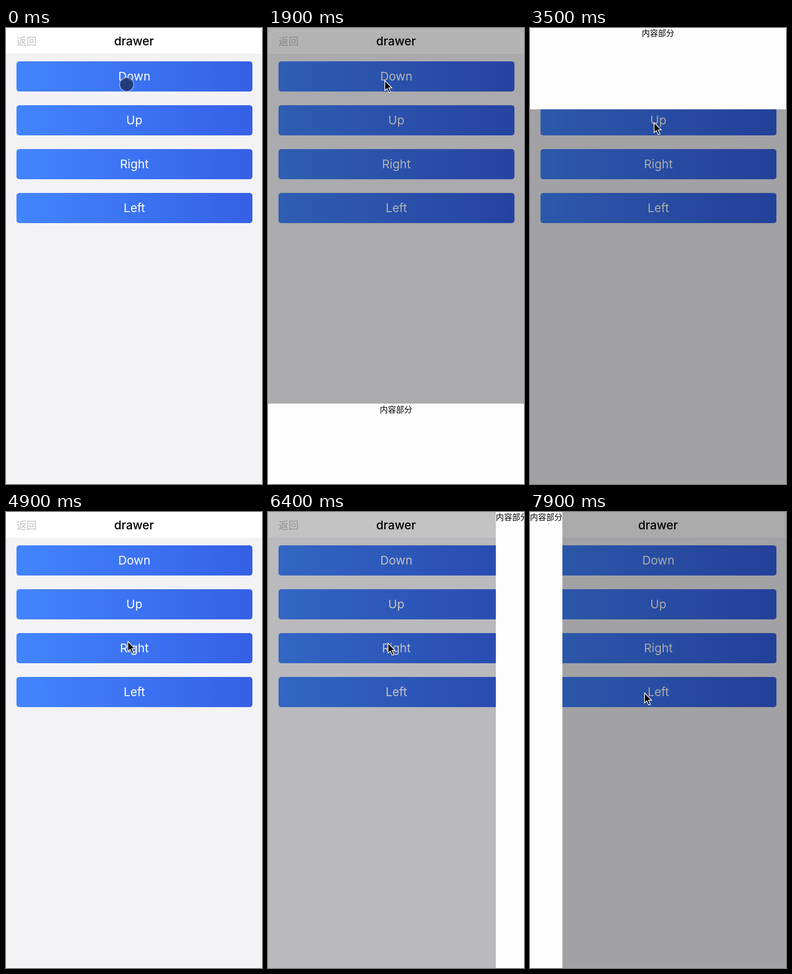
Animation, 561 px wide and 998 px high, one loop 8 s. Source, as an HTML page:

```html
<!DOCTYPE html>
<html lang="zh">
<head>
<meta charset="utf-8">
<title>drawer</title>
<style>
  html, body { margin: 0; width: 100%; height: 100%; overflow: hidden; background: #f3f2f5; }
  #stage { position: relative; width: 561px; height: 998px; overflow: hidden; background: #f3f2f5;
    font-family: Inter, "Noto Sans CJK SC", sans-serif; }
  #stage > * { position: absolute; }
  header { left: 0; top: 0; width: 561px; height: 57px; background: #fff; border-bottom: 1px solid #e6e5e8;
    font: 500 26px/57px Inter, sans-serif; color: #000; text-align: center; }
  .back { position: absolute; left: 23px; top: 13px; font: 500 22px/28px "Noto Sans CJK SC", sans-serif; color: #c0c0c0; }
  .btn { left: 22.5px; width: 517.5px; height: 66px; border-radius: 6px; color: #fff; text-align: center;
    font-size: 26px; line-height: 66px; background: linear-gradient(90deg, #4285ff, #3560e6); }
  .foot { left: 0; top: 997px; width: 561px; height: 1px; background: #fdfdfd; }
  #dim { inset: 0; background: #000; opacity: 0; }
  .drawer { background: #fefdfe; color: #000; text-align: center; white-space: nowrap;
    font: 17.8px/20px "Noto Sans CJK SC", sans-serif; }
  #down { left: 0; top: 820px; width: 561px; height: 178px; padding-top: 2px; }
  #up { left: 0; top: 0; width: 561px; height: 178px; }
  #right { left: 491px; top: 0; width: 71px; height: 998px; }
  #left { left: 0; top: 0; width: 71px; height: 998px; }
  #touch { left: -17px; top: -17px; width: 29px; height: 29px; border-radius: 50%;
    border: 2.5px solid rgba(160, 190, 245, .75); background: rgba(25, 44, 89, .77); background-clip: padding-box; }
  #arrow { left: -4px; top: -4px; overflow: visible; filter: drop-shadow(0 1px 1px rgba(0, 0, 0, .3)); }
</style>
</head>
<body>
<div id="stage">
  <header><span class="back">返回</span>drawer</header>
  <div class="foot"></div>
  <div id="dim"></div>
  <div class="drawer" id="down">内容部分</div>
  <div class="drawer" id="up">内容部分</div>
  <div class="drawer" id="right">内容部分</div>
  <div class="drawer" id="left">内容部分</div>
  <div id="touch"></div>
  <svg id="arrow" width="28" height="38" viewBox="-4 -4 28 38">
    <path d="M1 1V23L6 18.5L10 27.5L13.8 26L9.8 17H16.5Z" fill="#000" stroke="#fff" stroke-width="1.6"/>
  </svg>
</div>
<script>
const LOOP = 8000, STEP = 100;
const $ = id => document.getElementById(id);

['Down', 'Up', 'Right', 'Left'].forEach((label, i) => {
  const b = document.createElement('div');
  b.className = 'btn';
  b.style.top = 73 + 96 * i + 'px';
  b.textContent = label;
  $('stage').insertBefore(b, $('dim'));
});

// id, hidden offset x and y, opening time, closing time
const drawers = [
  ['down', 0, 180, 700, 1840],
  ['up', 0, -180, 2900, 4050],
  ['right', 72, 0, 5000, 6250],
  ['left', -72, 0, 7300, 9000]
];

// time, x, y of the pointer
const touchPath = [[0, 265, 124], [600, 260, 120]];
const arrowPath = [
  [700, 255, 114], [2300, 255, 114], [2750, 271, 206], [4450, 271, 206],
  [4850, 266, 282], [5000, 266, 282], [5400, 262, 286], [6650, 262, 286],
  [7150, 255, 388], [7300, 255, 388], [7700, 250, 395]
];

const clamp = v => Math.min(1, Math.max(0, v));
const easeOut = p => 1 - (1 - p) ** 3;
const easeIn = p => p * p;
const smooth = p => p * p * (3 - 2 * p);

function along(path, t) {
  let i = path.findIndex(k => k[0] > t);
  if (i < 0) i = path.length;
  if (i === 0 || i === path.length) return path[Math.max(0, i - 1)].slice(1);
  const [a, b] = [path[i - 1], path[i]];
  const p = smooth((t - a[0]) / (b[0] - a[0]));
  return [a[1] + (b[1] - a[1]) * p, a[2] + (b[2] - a[2]) * p];
}

const move = (id, x, y) => $(id).style.transform = `translate(${x}px, ${y}px)`;

function draw(t) {
  let dim = 0;
  for (const [id, dx, dy, open, close] of drawers) {
    const shut = clamp((t - close) / 440);
    const shown = easeOut(clamp((t - open) / 450)) * (1 - easeIn(shut) * (shut < .2 ? .6 : 1));
    move(id, dx * (1 - shown), dy * (1 - shown));
    $(id).style.visibility = shown > 0 ? 'visible' : 'hidden';
    dim += .34 * easeOut(clamp((t - open) / 800)) * (1 - clamp(shut * .9 + Math.max(0, shut - .5) * .2));
  }
  $('dim').style.opacity = dim;

  const touching = t < 800;
  $('touch').style.visibility = touching ? 'visible' : 'hidden';
  $('arrow').style.visibility = touching ? 'hidden' : 'visible';
  move('touch', ...along(touchPath, t));
  move('arrow', ...along(arrowPath, t));
}

const start = performance.now();
function tick() {
  const t = (performance.now() - start) % LOOP;
  draw(Math.floor(t / STEP) * STEP);
  requestAnimationFrame(tick);
}
tick();
</script>
</body>
</html>
```
